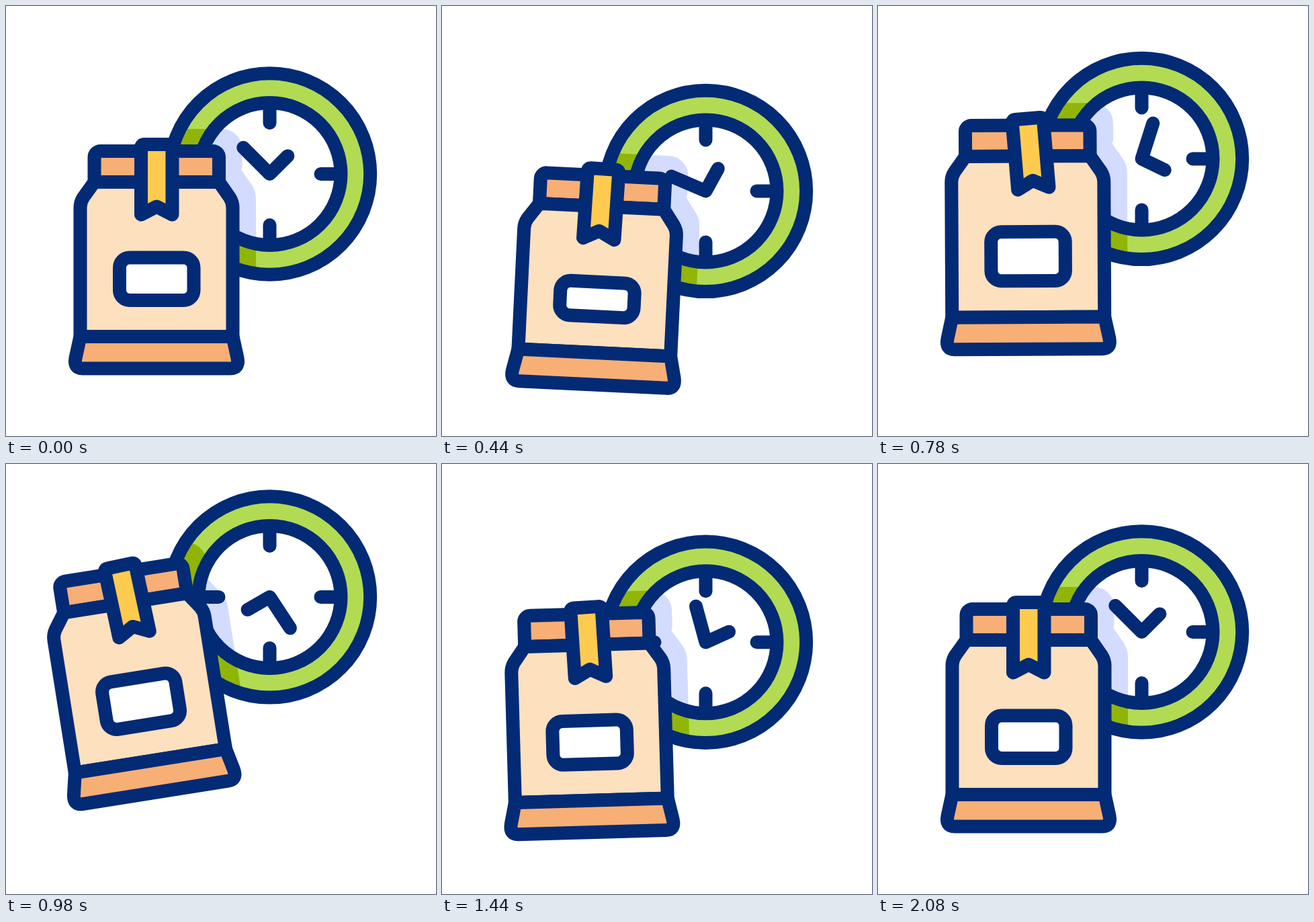
Animation of 640x640 px, one loop 2.1 s. Source, as an HTML page with a canvas:

```html
<!DOCTYPE html>
<html lang="en">
<head>
<meta charset="utf-8">
<title>Bag and clock</title>
<style>
html, body { margin: 0; width: 100%; height: 100%; overflow: hidden; background: #fff; }
canvas { display: block; width: 640px; height: 640px; }
</style>
</head>
<body>
<canvas id="stage" width="640" height="640"></canvas>
<script>
const ctx = document.getElementById('stage').getContext('2d');
const LOOP = 2100, START = 200, CX = 392.5, CY = 250;
const NAVY = '#032a75', GREEN = '#b2db53', DARK_GREEN = '#91b506', LAVENDER = '#d3dcfe',
  PEACH = '#fde0be', ORANGE = '#f7af76', YELLOW = '#ffcb4f', WHITE = '#fff';

// Smooth curve from rest through [time, value] keys; flat at every turning point.
function track(...keys) {
  keys.unshift([START, 0]);
  const gaps = keys.slice(1).map((k, i) => (k[1] - keys[i][1]) / (k[0] - keys[i][0]));
  const slopes = keys.map((_, i) => {
    const a = gaps[i - 1] || 0, b = gaps[i] || 0;
    return a * b > 0 ? 2 * a * b / (a + b) : 0;
  });
  return t => {
    if (t <= START) return 0;
    const i = keys.findIndex(k => k[0] > t) - 1;
    if (i < 0) return keys[keys.length - 1][1];
    const [t0, v0] = keys[i], [t1, v1] = keys[i + 1];
    const d = t1 - t0, p = (t - t0) / d, q = 1 - p;
    return v0 * q * q * (1 + 2 * p) + v1 * p * p * (3 - 2 * p)
      + d * p * q * (slopes[i] * q - slopes[i + 1] * p);
  };
}

// Crouch, leap, land, rebound, settle.
const clockY = track([520, 30], [960, -52.4], [1180, -29], [1355, 32], [1600, -27], [2080, 0]);
const bagY = track([490, 26], [950, -53], [1310, 51], [1530, -15], [2040, 0]);
const bagTilt = track([490, 3], [780, -.25], [960, -9.3], [1200, 3.2], [1540, -2.9], [1900, 0]);
const bagStretch = track([490, -13], [850, 12], [1290, -7], [1540, 6], [1760, -5], [2020, 0]);
const ribbonSwing = track([490, 1.2], [860, -5.3], [1210, 2.5], [1460, -2.1], [1750, 2], [2020, 0]);
// Wind up, one full turn, overshoot, settle.
const hourTurn = track([500, -18], [1420, 381], [1720, 360]);
const minuteTurn = track([510, -25], [1425, 390], [1720, 360]);

const rad = deg => deg * Math.PI / 180;

function paint(path, fill, line = NAVY) {
  ctx.fillStyle = fill;
  ctx.fill(path);
  ctx.strokeStyle = line;
  ctx.stroke(path);
}

function disc(y, r) {
  const p = new Path2D();
  p.arc(CX, y, r, 0, 2 * Math.PI);
  return p;
}

function box(x, y, w, h, r) {
  const p = new Path2D();
  p.roundRect(x, y, w, h, r);
  return p;
}

function rotateAbout(x, y, deg) {
  ctx.translate(x, y);
  ctx.rotate(rad(deg));
  ctx.translate(-x, -y);
}

const collarPath = (up, r) => box(131.5, 216 - up, 185.5, 46, [r, r, 2, 2]);
const bodyPath = up => new Path2D(`M131.5 ${262 - up} L115 ${285 - up}
  Q110.5 ${292 - up} 110.5 ${300 - up} V492 H337.5 V${300 - up}
  Q337.5 ${292 - up} 333 ${285 - up} L317 ${262 - up} Z`);
const basePath = new Path2D('M110.5 492 L103.5 524 Q100.5 539.5 114 539.5 H334 Q347.5 539.5 344.5 524 L337.5 492 Z');
const ribbonPath = new Path2D('M201 211 Q201 206 206 206 H242.5 Q247.5 206 247.5 211 V310.5 L224.2 298.5 L201 310.5 Z');

function poseBag(t) {
  ctx.translate(0, bagY(t));
  rotateAbout(224, 550, bagTilt(t));
}

// The bag's shadow, seen only inside a disc of the clock.
function castShadow(t, clip, color) {
  const up = bagStretch(t);
  ctx.save();
  ctx.clip(clip);
  ctx.translate(24.5, -13);
  poseBag(t);
  paint(bodyPath(up), color, color);
  ctx.translate(0, -10);
  paint(collarPath(up, 20), color, color);
  ctx.restore();
}

function drawClock(t) {
  const y = CY + clockY(t), rim = disc(y, 149.7), face = disc(y, 106);
  ctx.fillStyle = GREEN;
  ctx.fill(rim);
  castShadow(t, rim, DARK_GREEN);
  ctx.fillStyle = WHITE;
  ctx.fill(face);
  castShadow(t, face, LAVENDER);

  const lines = new Path2D();
  const tip = (deg, len) => [CX + len * Math.sin(rad(deg)), y - len * Math.cos(rad(deg))];
  for (let a = 0; a < 360; a += 90) {
    lines.moveTo(...tip(a, 76));
    lines.lineTo(...tip(a, 104));
  }
  lines.moveTo(...tip(minuteTurn(t) - 45, 55.5));
  lines.lineTo(CX, y);
  lines.lineTo(...tip(hourTurn(t) + 45, 38));

  ctx.strokeStyle = NAVY;
  for (const p of [rim, face, lines]) ctx.stroke(p);
}

function drawBag(t) {
  const up = bagStretch(t);
  ctx.save();
  poseBag(t);
  paint(collarPath(up, 9), ORANGE);
  paint(bodyPath(up), PEACH);
  paint(basePath, ORANGE);
  paint(box(169, 374.5 - up, 110.5, 63.5 + up, 15), WHITE);
  ctx.translate(0, -up);
  rotateAbout(224, 206, ribbonSwing(t));
  paint(ribbonPath, YELLOW);
  ctx.restore();
}

function frame() {
  const t = performance.now() % LOOP;
  ctx.fillStyle = WHITE;
  ctx.fillRect(0, 0, 640, 640);
  ctx.lineWidth = 20;
  ctx.lineCap = ctx.lineJoin = 'round';
  drawClock(t);
  drawBag(t);
  requestAnimationFrame(frame);
}
frame();
</script>
</body>
</html>
```
